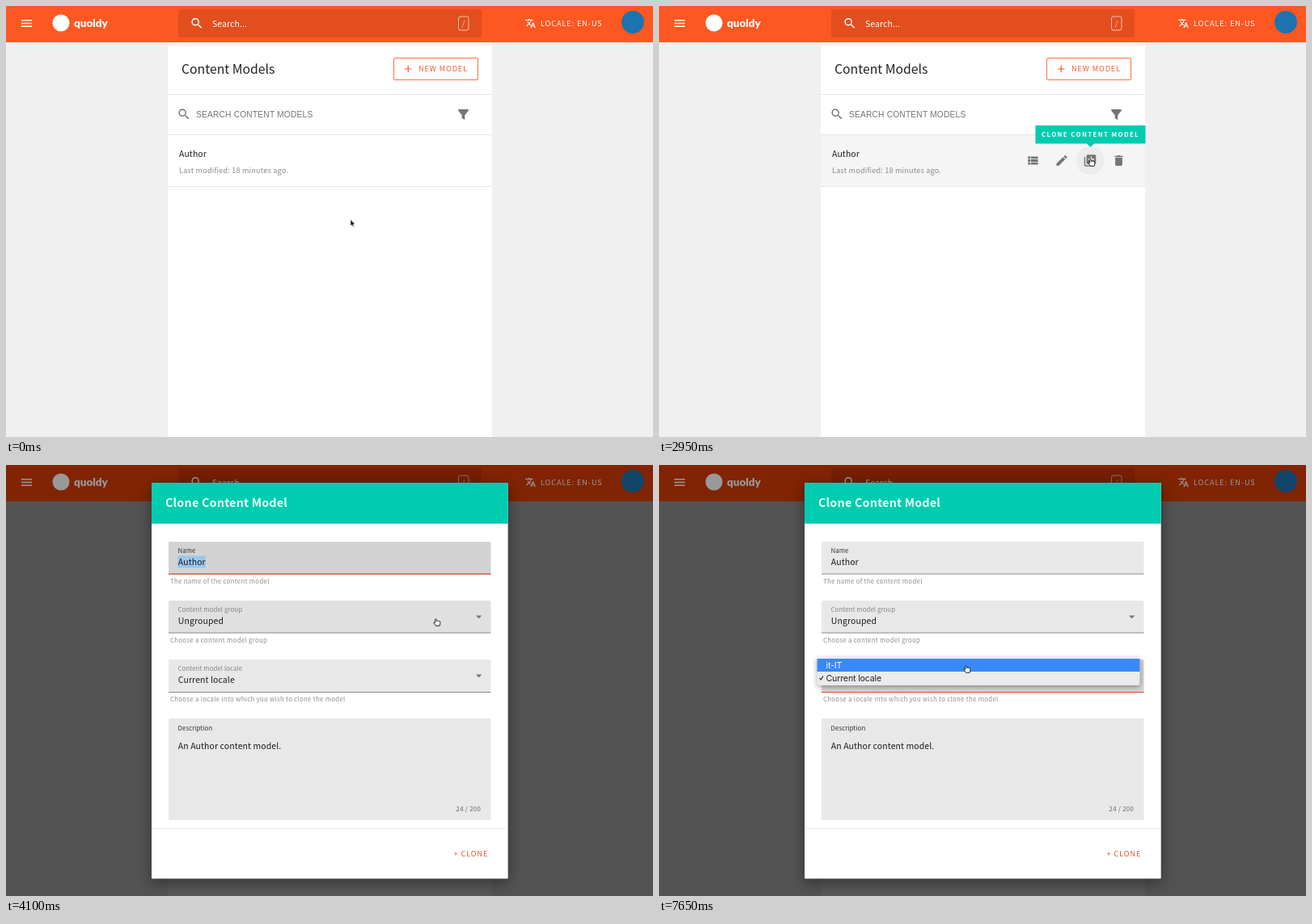
An HTML page for the animation above (8000 ms loop, 800 by 534 pixels).

```html
<!DOCTYPE html>
<html lang="en">
<head>
<meta charset="utf-8">
<title>Clone Content Model</title>
<style>
  html, body { margin: 0; height: 100%; overflow: hidden; background: #f0f0f0; }
  svg { display: block; width: 100vw; height: 100vh; }
  text { font-family: "Noto Sans CJK JP", "Noto Sans CJK SC", "Noto Sans CJK", "Noto Sans", sans-serif; white-space: pre; }
  #dialog { filter: drop-shadow(0 5px 9px rgba(0,0,0,.4)); }
  #menu { filter: drop-shadow(0 2px 3px rgba(0,0,0,.35)); }
</style>
</head>
<body>
<svg id="stage" viewBox="0 0 800 534"></svg>
<script>
const LOOP = 8000, ORANGE = '#fd5722', TEAL = '#00ccb0', GREY = '#757575';

const icons = {
  menu: 'M3 18h18v-2H3zm0-5h18v-2H3zm0-7v2h18V6z',
  search: 'M15.5 14h-.79l-.28-.27A6.5 6.5 0 1 0 13.73 14.43l.27.28v.79l5 4.99L20.49 19zm-6 0a4.5 4.5 0 1 1 0-9 4.5 4.5 0 0 1 0 9z',
  translate: 'M12.87 15.07l-2.54-2.51.03-.03c1.74-1.94 2.98-4.17 3.71-6.53H17V4h-7V2H8v2H1v2h11.17C11.5 7.92 10.44 9.75 9 11.35 8.07 10.32 7.3 9.19 6.69 8h-2c.73 1.63 1.73 3.17 2.98 4.56l-5.09 5.02L4 19l5-5 3.11 3.11zM18.5 10h-2L12 22h2l1.12-3h4.75L21 22h2zm-2.62 7l1.62-4.33L19.12 17z',
  filter: 'M3.5 3h17v2.5L14.5 13v8l-5-3v-5l-6-7.5z',
  list: 'M4 14h4v-4H4zm0 5h4v-4H4zM4 9h4V5H4zm5 5h12v-4H9zm0 5h12v-4H9zM9 5v4h12V5z',
  edit: 'M3 17.25V21h3.75L17.81 9.94l-3.75-3.75zM20.71 7.04c.39-.39.39-1.02 0-1.41l-2.34-2.34c-.39-.39-1.02-.39-1.41 0l-1.83 1.83 3.75 3.75z',
  clone: 'M4 6H2v14c0 1.1.9 2 2 2h14v-2H4zm16-4H8c-1.1 0-2 .9-2 2v12c0 1.1.9 2 2 2h12c1.1 0 2-.9 2-2V4c0-1.1-.9-2-2-2zm-1 9h-4v4h-2v-4H9V9h4V5h2v4h4z',
  trash: 'M6 19c0 1.1.9 2 2 2h8c1.1 0 2-.9 2-2V7H6zM19 4h-3.5l-1-1h-5l-1 1H5v2h14z'
};

const rect = (x, y, w, h, fill, more = '') =>
  `<rect x="${x}" y="${y}" width="${w}" height="${h}" fill="${fill}" ${more}/>`;
const icon = (name, cx, cy, fill = GREY, scale = .73) =>
  `<path d="${icons[name]}" fill="${fill}" transform="translate(${cx} ${cy}) scale(${scale}) translate(-12 -12)"/>`;

// Text styles: size, letter spacing, further attributes
const styles = {
  headline: [15.75, 0], body: [10.46, .11], small: [9.15, .18], label: [7.84, .08], caption: [7.84, .29],
  button: [9.15, .91], title: [14.4, .18, 'font-weight="700"'], tip: [7.84, 1.4, 'font-weight="700"'],
  input: [10.2, .2, 'style="font-family:Liberation Sans,sans-serif"'],
  option: [10.6, -.15, 'style="font-family:Inter,sans-serif"'],
  brand: [13.5, 0, 'font-weight="900" style="font-family:Lato,sans-serif"']
};
const text = (style, x, y, string, fill, id = '') => {
  const [size, spacing, more = ''] = styles[style];
  return `<text x="${x}" y="${y}" font-size="${size}" letter-spacing="${spacing}" fill="${fill}" ${more} ${id && `id="${id}"`}>${string}</text>`;
};

const header = rect(0, 0, 800, 45, ORANGE) + rect(0, 0, 800, 45, '#d53c07', 'id="barTint"') +
  '<circle cx="68" cy="21" r="10.5" fill="#fff"/>' + text('brand', 84, 26, 'quoldy', '#fff') +
  icon('menu', 25.5, 21.5, '#fff') +
  rect(213, 4, 375, 35, '#000', 'rx="2" opacity=".1"') + icon('search', 236, 21.5, '#fff') +
  text('body', 255, 25.5, 'Search...', '#fff') +
  rect(559.5, 13, 12.5, 17, 'none', 'rx="2.5" stroke="#fff" stroke-opacity=".65"') +
  text('small', 563.7, 25, '/', '#ffd0c0') +
  icon('translate', 648.5, 21.5, '#fff', .58) + text('button', 661, 24.8, 'LOCALE: EN-US', '#fff') +
  '<circle cx="775" cy="20" r="14" fill="#1d72b0"/>';

const page = rect(0, 0, 800, 534, '#f0f0f0') + rect(200, 45, 401, 489, '#fff') +
  text('headline', 217, 84, 'Content Models', '#222') +
  rect(479.5, 64.5, 104, 27, '#fff', `rx="1.5" stroke="${ORANGE}" stroke-opacity=".85"`) +
  `<path d="M493 78h8.5M497.25 73.75v8.5" stroke="${ORANGE}" stroke-width="1.2"/>` +
  text('button', 510, 81.3, 'NEW MODEL', '#ec5b30') +
  icon('search', 220, 134) + text('input', 235, 137.5, 'SEARCH CONTENT MODELS', GREY) + icon('filter', 565.5, 134.5) +
  rect(200, 160, 401, 63, '#f5f5f5', 'id="rowHover"') +
  [109, 159, 223].map(y => rect(200, y, 401, 1, '#e6e6e6')).join('') +
  text('body', 214, 187, 'Author', '#222') + text('small', 214, 206.5, 'Last modified: 18 minutes ago.', '#8a8a8a') +
  '<g id="actions"><circle id="iconHover" cx="533" cy="191.5" r="17.5" fill="#ececec"/>' +
  icon('list', 462, 191.5) + icon('edit', 498, 191.5) + icon('clone', 533, 191.5) + icon('trash', 568.5, 191.5) + '</g>';

const field = (id, y, h, label, value, helper, isSelect) =>
  `<path d="M201 ${y + h}V${y + 2}q0-2 2-2h394.5q2 0 2 2V${y + h}z" fill="#e8e8e8"/>` +
  rect(201, y, 398.5, h, '#000', `id="${id}Shade"`) +
  (helper ? rect(201, y + h - .5, 398.5, 1, '#8c8c8c') : '') +
  rect(201, y + h - .5, 398.5, 1.1, '#e2532a', `id="${id}Line"`) +
  rect(212.5, y + 17.5, 34.5, 15, '#9bc6ee', `id="${id}Selection" opacity="0"`) +
  text('label', 212.5, y + (helper ? 13.5 : 15), label, isSelect ? '#858585' : '#333') +
  text('body', 212.8, y + (helper ? 29.2 : 38), value, '#1c1c1c') +
  (helper ? text('caption', 203, y + 52.3, helper, '#8e8e8e') : '') +
  (isSelect ? `<path d="M581 ${y + 18.5}h7.4l-3.7 3.8z" fill="#757575"/>` : '');

const dialog = rect(180, 22, 440.7, 490.6, '#fff', 'rx="1"') + rect(180, 22, 440.7, 50.7, TEAL) +
  text('title', 197, 51.5, 'Clone Content Model', '#eafffa') +
  field('name', 95, 40, 'Name', 'Author', 'The name of the content model') +
  field('group', 168, 40, 'Content model group', 'Ungrouped', 'Choose a content model group', true) +
  field('locale', 241, 40.5, 'Content model locale', 'Current locale', 'Choose a locale into which you wish to clone the model', true) +
  field('description', 314, 126, 'Description', 'An Author content model.') +
  text('caption', 556.5, 428.6, '24 / 200', '#666') +
  rect(180, 450, 440.7, 1, '#ececec') + text('button', 553.5, 484.5, '+ CLONE', '#e2532a');

const menu = rect(195.5, 238, 399, 35, '#ebebeb', 'rx="3"') + rect(195.5, 240, 399, 16, '#3b88f7', 'id="choice"') +
  text('option', 206.5, 252, 'it-IT', '#222', 'italian') + text('option', 206.5, 267.6, 'Current locale', '#222', 'current') +
  '<path id="check" d="M198.6 264.2l1.5 1.8 2.8-4.4" fill="none" stroke-width="1.1"/>';

const tooltip = rect(465.5, 148, 136, 22.5, TEAL) + `<path d="M528.5 170h10l-5 5z" fill="${TEAL}"/>` +
  text('tip', 473, 162.2, 'CLONE CONTENT MODEL', '#fff');

const cursor = '<path id="arrow" d="M-2-4.5v8l1.8-1.5 1.2 2.6 1.4-.6-1.1-2.5h2.4z" fill="#111" stroke="#fff" stroke-width=".6"/>' +
  '<path id="hand" d="M-2.3-3.6c0-1.1 1.6-1.1 1.6 0v2c.5-.6 1.3-.5 1.5 0 .5-.5 1.3-.3 1.5.2.6-.4 1.5-.1 1.5.8v2.2l-.7 2.7h-4.6l-2.4-3.6c-.6-1 .6-1.6 1.6-.3z" fill="#fff" stroke="#111" stroke-width=".9" stroke-linejoin="round"/>';

document.getElementById('stage').innerHTML =
  `<g>${page}</g>` + rect(0, 45, 800, 489, '#000', 'id="pageScrim"') +
  `<g>${header}</g>` + rect(0, 0, 800, 45, '#000', 'id="headerScrim"') +
  `<g id="dialog">${dialog}</g><g id="menu">${menu}</g><g id="tooltip">${tooltip}</g><g id="cursor">${cursor}</g>`;

const parts = Object.fromEntries([...document.querySelectorAll('[id]')].map(el => [el.id, el]));
const set = (id, name, value) => parts[id].setAttribute(name, value);
const show = (id, on) => set(id, 'visibility', on ? 'visible' : 'hidden');
const fade = (id, value) => set(id, 'opacity', value);

const progress = (t, start, end) => Math.min(1, Math.max(0, (t - start) / (end - start)));
const smooth = p => p * p * (3 - 2 * p);
// Interpolates [time, ...values] keys
function at(keys, t, ease = p => p) {
  let i = 0;
  while (i < keys.length - 2 && t >= keys[i + 1][0]) i++;
  const [a, b] = [keys[i], keys[i + 1]];
  const p = ease(progress(t, a[0], b[0]));
  return a.slice(1).map((v, k) => v + (b[k + 1] - v) * p);
}
// cubic-bezier(0, 0, .2, 1)
function decelerate(x) {
  let low = 0, high = 1;
  for (let i = 0; i < 20; i++) {
    const s = (low + high) / 2;
    if (.6 * s * s * (1 - s) + s ** 3 < x) low = s; else high = s;
  }
  return 3 * low * low - 2 * low ** 3;
}

const pointerKeys = [[300, 428, 269], [1100, 497, 203], [1150, 497, 203], [1500, 527, 199], [1800, 535, 194],
  [4050, 535, 194], [4100, 533, 195], [4800, 533, 195], [5500, 378, 263], [6850, 378, 263], [7150, 379, 262],
  [7300, 379, 262], [7600, 381, 253]];
// Opacity of the page scrim, the header scrim and the header bar's tint
const scrimKeys = [[3045, 0, 0, 0], [3100, .2, .2, .2], [3200, .58, .32, .7], [3400, .655, .4, 1]];

function render(t) {
  const [x, y] = at(pointerKeys, t, smooth);
  const opened = t >= 3045, menuOpen = t >= 5650;
  const overRow = !opened && y < 223, overClone = overRow && x > 517;
  set('cursor', 'transform', `translate(${x} ${y})`);
  show('hand', overClone || opened);
  show('arrow', !overClone && !opened);
  show('rowHover', overRow);
  show('actions', overRow);
  fade('iconHover', overClone ? 1 : 0);
  fade('tooltip', t < 3150 ? progress(t, 1390, 1545) : 0);

  const [pageDim, headerDim, barTint] = at(scrimKeys, t);
  fade('pageScrim', pageDim);
  fade('headerScrim', headerDim);
  fade('barTint', barTint);

  const scale = .8 + .2 * decelerate(progress(t, 3045, 3195));
  set('dialog', 'transform', `translate(400.5 267.5) scale(${scale}) translate(-400.5 -267.5)`);
  fade('dialog', progress(t, 3045, 3120));

  const nameFocus = progress(t, 3230, 3400) - progress(t, 5500, 5600);
  const localeFocus = progress(t, 5500, 5600);
  const shade = (id, top, bottom, focus) => {
    const hover = opened && !menuOpen && y > top && y < bottom ? .035 : 0;
    fade(id + 'Shade', Math.max(hover, focus * .09));
    fade(id + 'Line', focus);
  };
  shade('name', 95, 135, nameFocus);
  shade('group', 168, 208, 0);
  shade('locale', 241, 281, localeFocus);
  shade('description', 314, 440, 0);
  fade('nameSelection', t > 3250 && t < 5500 ? 1 : 0);

  const italian = y < 256;
  show('menu', menuOpen);
  set('choice', 'y', italian ? 240 : 256);
  set('italian', 'fill', italian ? '#fff' : '#222');
  set('current', 'fill', italian ? '#222' : '#fff');
  set('check', 'stroke', italian ? '#222' : '#fff');
}

const begin = performance.now();
(function tick() {
  render((performance.now() - begin) % LOOP);
  requestAnimationFrame(tick);
})();
</script>
</body>
</html>
```
